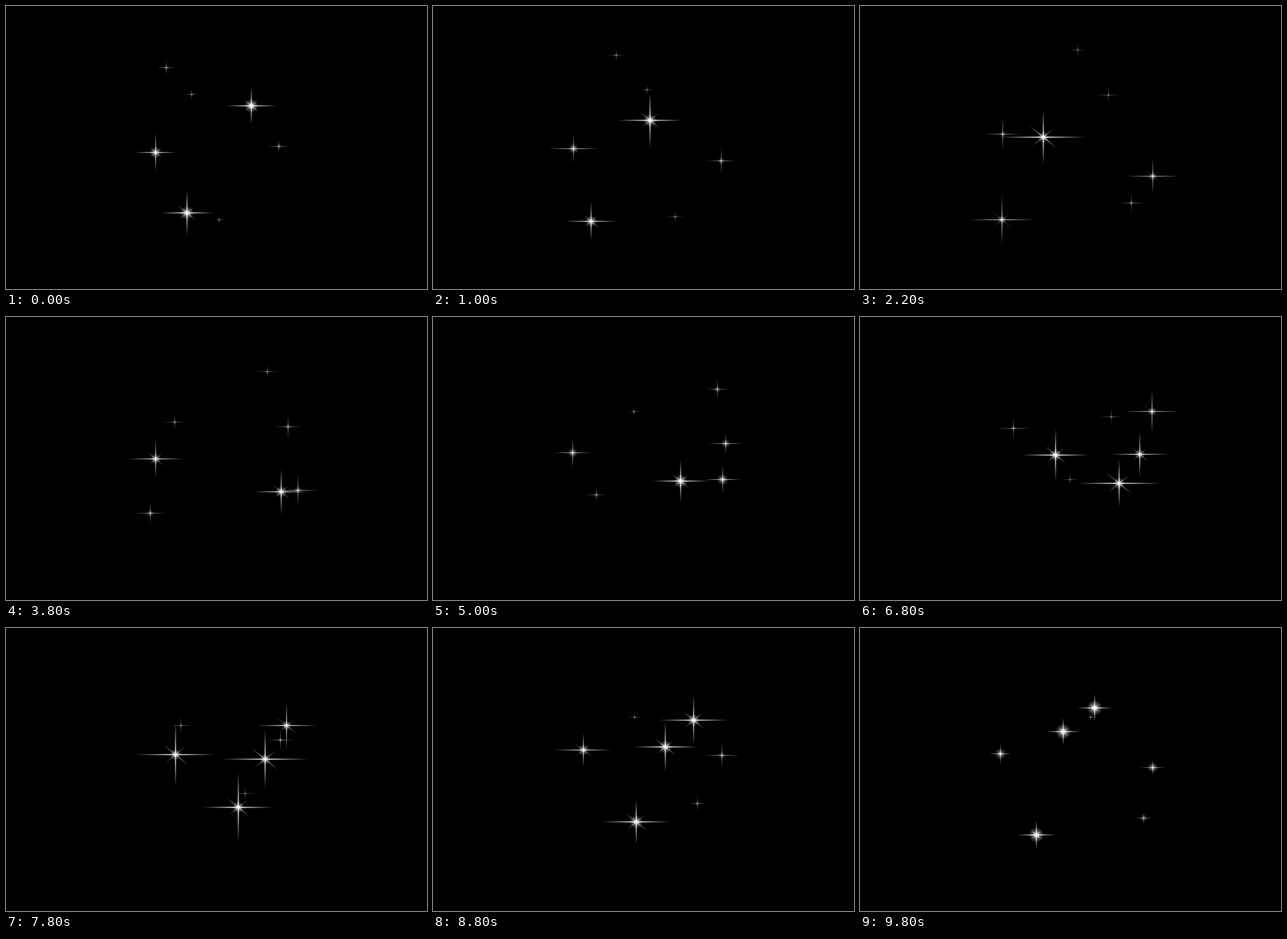
Recreate the animation shown at these times as an HTML page with a canvas. Size 550 by 370 pixels, loop 10000 ms.

```html
<!DOCTYPE html>
<html lang="en">
<head>
<meta charset="utf-8">
<title>Orbiting stars</title>
<style>
html, body { margin: 0; width: 100%; height: 100%; overflow: hidden; background: #000; }
canvas { display: block; }
</style>
</head>
<body>
<canvas id="stage" width="550" height="370"></canvas>
<script>
const ctx = document.getElementById('stage').getContext('2d');
const LOOP = 10000, STEP = 200;
const SPIN = 0.38, BOB = SPIN * 1.5; // radians per second
const CENTRE = 282, RADIUS = 100.5, SWAY = 35;
const SLANT = Math.PI / 4.6;

// Where each star starts: orbit phase, mean height, vertical phase
const stars = [
  { turn: -0.82, y: 92, bob: -2.8 },
  { turn: -0.41, y: 144, bob: -2.19 },
  { turn: 2.75, y: 150, bob: -0.595 },
  { turn: 4.18, y: 156, bob: 1.555 },
  { turn: 0.825, y: 194, bob: -0.325 },
  { turn: 3.62, y: 247, bob: 0.72 },
  { turn: -0.035, y: 244.5, bob: 1.52 }
];

const clamp = (n, lo, hi) => Math.min(hi, Math.max(lo, n));
const white = a => `rgba(255,255,255,${clamp(a, 0, 1)})`;

// All rays swell together twice per loop and sink just before it ends
function pulse(t) {
  const swell = 0.97 - 0.19 * Math.cos(t * Math.PI * 2 / 5);
  return swell * (1 - 0.5 * Math.pow(t / 10, 20));
}

// Small independent shimmer for each ray
const shimmer = (t, rate, phase) => 1 + 0.14 * Math.sin(rate * t + phase);

// A thin line through the centre that fades towards both ends
function ray(angle, len, width, alpha) {
  ctx.save();
  ctx.rotate(angle);
  const g = ctx.createLinearGradient(-len, 0, len, 0);
  g.addColorStop(0, white(0));
  g.addColorStop(0.25, white(alpha * 0.48));
  g.addColorStop(0.5, white(alpha));
  g.addColorStop(0.75, white(alpha * 0.48));
  g.addColorStop(1, white(0));
  ctx.fillStyle = g;
  ctx.fillRect(-len, -width / 2, len * 2, width);
  ctx.restore();
}

function glow(r, alpha) {
  const g = ctx.createRadialGradient(0, 0, 0, 0, 0, r);
  g.addColorStop(0, white(alpha));
  g.addColorStop(0.2, white(alpha * 0.8));
  g.addColorStop(0.5, white(alpha * 0.33));
  g.addColorStop(1, white(0));
  ctx.fillStyle = g;
  ctx.fillRect(-r, -r, r * 2, r * 2);
}

function drawStar(star, i, t) {
  const angle = star.turn + SPIN * t;
  const depth = -Math.cos(angle); // 1 is nearest
  const near = clamp(depth, 0, 1);
  const x = Math.round(CENTRE + RADIUS * Math.sin(angle));
  const y = Math.round(star.y + SWAY * Math.sin(star.bob + BOB * t));

  const power = pulse(t);
  const h = (28 + 17 * depth) * power * shimmer(t, 2.3, i * 1.9);
  const v = (21 + 13 * depth) * power * shimmer(t, 2.9, i * 2.7);
  const alpha = clamp(0.65 + 0.42 * depth, 0.22, 1);
  const width = 1 + 0.5 * near;

  ctx.save();
  ctx.translate(x + 0.5, y + 0.5);
  glow((6.3 + 3 * depth) * (1.35 - 0.45 * power), alpha);
  ray(0, h * 1.05, width, alpha);
  ray(Math.PI / 2, v * 1.05, width, alpha);
  const slant = 0.8 * clamp(depth + 0.15, 0, 1);
  if (slant > 0) {
    ray(SLANT, h * 0.43, 1, slant);
    ray(-SLANT, h * 0.36, 1, slant * 0.8);
  }
  ctx.restore();
}

function render(now) {
  const t = Math.floor((now % LOOP) / STEP) * STEP / 1000;
  ctx.fillStyle = '#000';
  ctx.fillRect(0, 0, 550, 370);
  stars.forEach((star, i) => drawStar(star, i, t));
}

let start = null;
function tick(now) {
  if (start === null) start = now;
  render(now - start);
  requestAnimationFrame(tick);
}
render(0);
requestAnimationFrame(tick);
</script>
</body>
</html>
```
